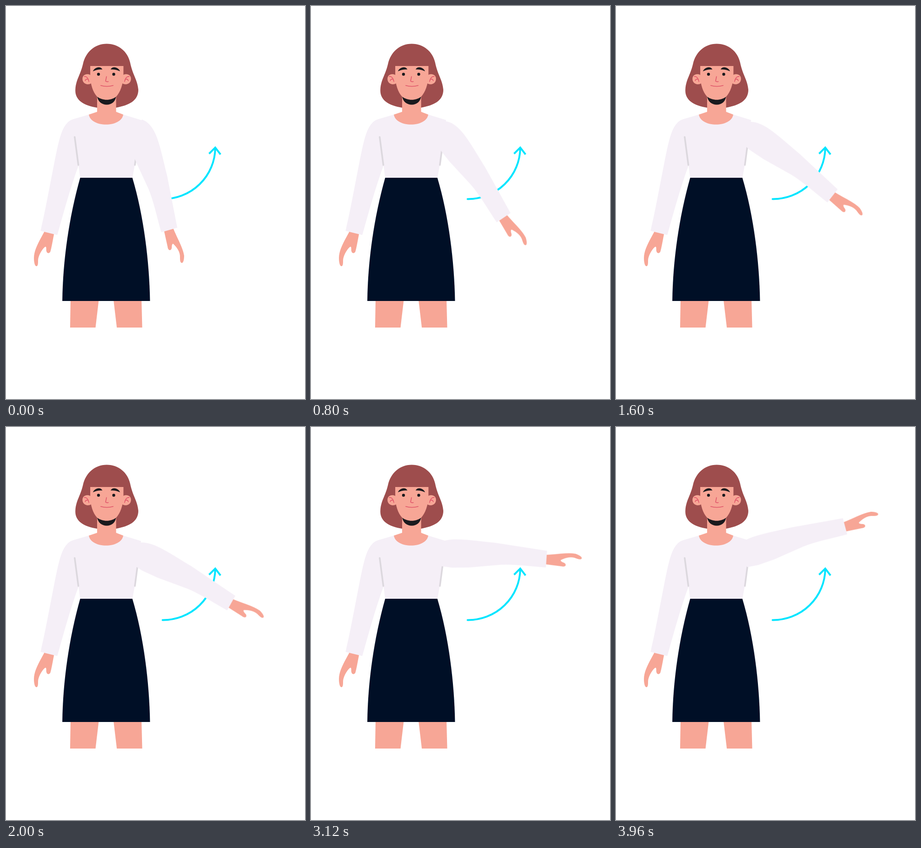
An HTML page for the animation above (4 s loop, 653 by 858 pixels).

```html
<!DOCTYPE html>
<html lang="en">
<head>
<meta charset="utf-8">
<title>Arm raise</title>
<style>
  html, body { margin: 0; width: 100%; height: 100%; overflow: hidden; background: #fff; }
  svg { display: block; width: 100%; height: 100%; }
  .skin { fill: #f7a696; }
  .shirt { fill: #f5eff7; }
  .hair { fill: #9e4d4d; }
  .skirt { fill: #000f26; }
  .dark { fill: #1a1a1e; }
  .line { fill: none; stroke: #e0566a; stroke-width: 1.6; stroke-linecap: round; }
  .fold { stroke: #dcd8de; stroke-width: 3.6; stroke-linecap: round; }
  .arrow { fill: none; stroke: #00e5ff; stroke-width: 4; stroke-linecap: round; }
  .raise { transform-origin: 290px 280px; animation: raise 4s steps(100) infinite; }
  .reach { animation: reach 4s infinite; }
  @keyframes raise { to { transform: rotate(-90deg); } }
  /* the shoulder slides out along the arm and back while it turns */
  @keyframes reach {
    0% { transform: translate(0, 0); animation-timing-function: cubic-bezier(.39, .575, .565, 1); }
    50% { transform: translate(2.4px, 7.6px); animation-timing-function: cubic-bezier(.47, 0, .745, .715); }
    100% { transform: translate(0, 0); }
  }
</style>
</head>
<body>
<svg viewBox="0 0 653 858">
  <g class="arrow">
    <path d="M342 421.5A114 113 0 0 0 457 310"/>
    <path d="M443.5 322.5L457 309L468.5 324" stroke-linecap="butt"/>
  </g>

  <g class="skin">
    <path d="M141 643H202.500L195.500 702H140Z"/>
    <path d="M235 643H296L297.500 702H242Z"/>
    <path d="M84 492C76 508 61 530 61 550C61 560 63 568 66.500 568C70 568 70 562 70 556C70 546 78 532 85 526C88 524 88 528 88 534C89 541 95 541 97 536C100 525 102 512 105 497Z"/>
  </g>

  <path class="shirt" d="M181 237L147 247C126 253 119 281 113 306C104 345 91 424 75.500 491L112 500C126 451 140 398 158.500 348L162 376H276L281 348L288 306L295 249L256 237Z"/>
  <path class="fold" d="M150 286L158 347M289.500 286L281.500 347"/>
  <path class="skirt" d="M162 375H276C300 455 313 555 314.500 644H123C124 555 138 460 162 375Z"/>

  <g class="raise"><g class="reach">
    <path class="skin" d="M345 490L353 526C354 535 361 535 362 528C362 520 364 517 367 521C373 527 381 537 380 550C380 557 381 561 384.500 561C388 560 389 552 389 545C387 529 374 507 365 485Z"/>
    <path class="shirt" d="M297 248C313 253 324 271 330 288C339 313 345 344 352 371L374 484L339 494C329 458 322 425 311 399L282 336L269 301L264 277Z"/>
  </g></g>

  <path class="hair" d="M199 222C170 217 150 206 151.500 182C153 160 162 152 168 127C174 100 194 82.500 220 82.500C246 82.500 266 100 271 123C277 152 287 160 289 183C289 207 268 217 240 222Z"/>
  <path class="skin" d="M199 190H240.500V231L256 237C252 266 185 266 181 237L199 231Z"/>
  <path class="dark" d="M199 196C201 222 239 222 240.500 196Z"/>

  <g id="ear">
    <path class="skin" d="M186 152C180 146 167 148 167 159C167 169 177 174 186 169Z"/>
    <path class="line" stroke-width="1.400" d="M171 154C176 153 180 158 181 165M173 163C174 160 176 159 178 160"/>
  </g>
  <use href="#ear" transform="matrix(-1 0 0 1 440 0)"/>

  <path class="skin" d="M184 131H256.500V150C256 172 249 189 240.500 198C229 207 211 207 199 198C190 188 184 172 184 150Z"/>
  <g id="brow">
    <path class="dark" d="M190 142.500C193 134 206 130 210.500 138.500C203 138 197 139 190 142.500Z"/>
  </g>
  <use href="#brow" transform="matrix(-1 0 0 1 439 0)"/>
  <circle class="dark" cx="202" cy="149" r="3.200"/>
  <circle class="dark" cx="235.300" cy="149" r="3.200"/>
  <path class="line" d="M219.500 154L217.500 164Q220 166 223.500 165M207 173.500Q220 177.500 234 173.500"/>
</svg>
</body>
</html>
```
